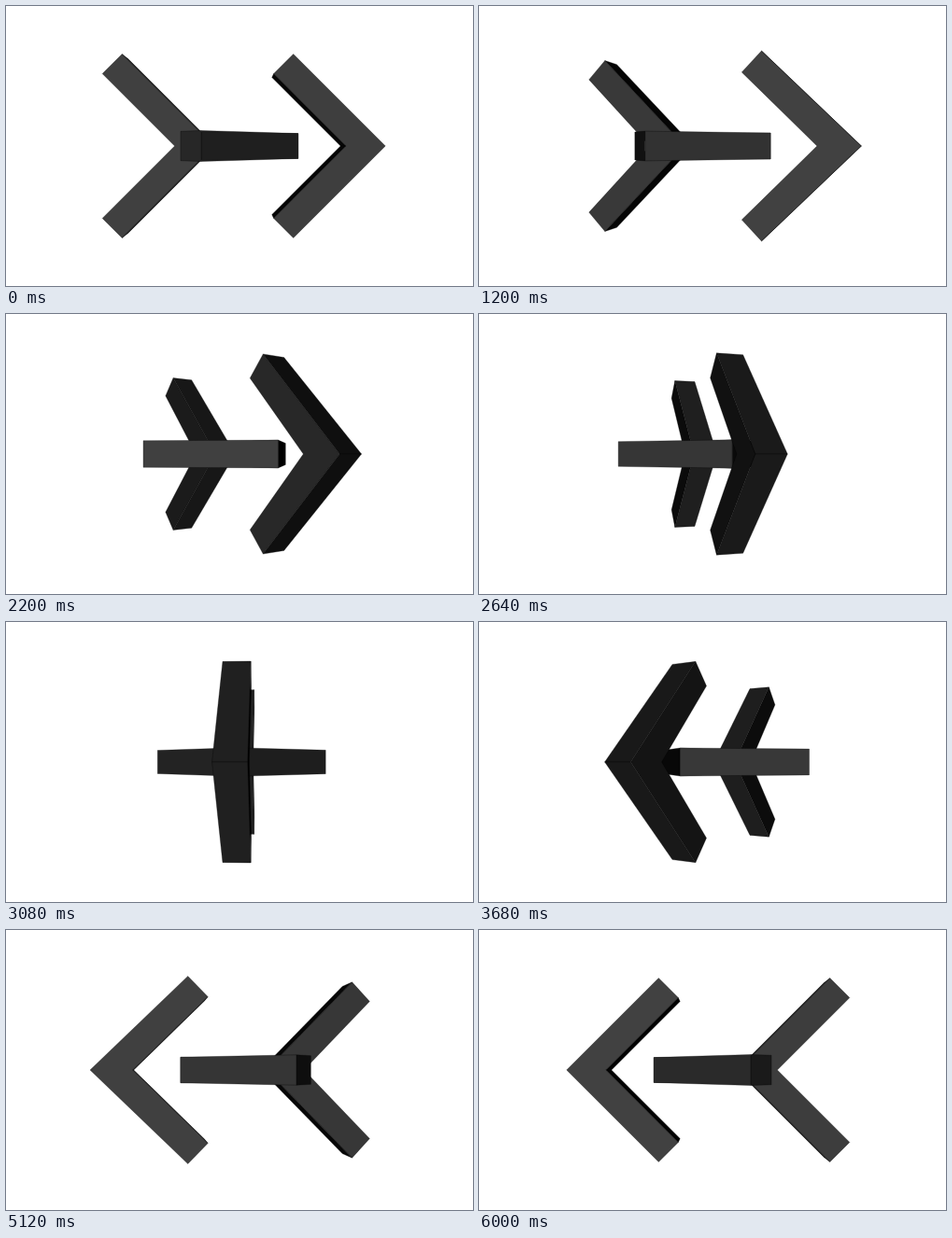
An HTML page with a canvas for the animation above (6040 ms loop, 500 px wide and 300 px high).

```html
<!DOCTYPE html>
<html lang="en">
<head>
<meta charset="utf-8">
<title>Turning arrow</title>
<style>
html, body { margin: 0; width: 500px; height: 300px; overflow: hidden; background: #fff; }
canvas { display: block; }
</style>
</head>
<body>
<canvas width="500" height="300"></canvas>
<script>
const ctx = document.querySelector('canvas').getContext('2d');
const LOOP = 6040, STEP = 40;
const EYE = [0, 0, 508], LAMP = [-45, 0, 508];
const H = 95.9, Q = 20.5;      // chevron half height, end cut offset
const HALF = 13.4;             // half thickness
const MID = 62.75, GAP = 89.3; // middle tip, distance between tips

// Chevron outline, tip at the origin, counter-clockwise
const ring = [[0, 0], [-H, H], [-H - Q, H - Q], [-2 * Q, 0], [-H - Q, Q - H], [-H, -H]];

// Extrude an outline into a list of faces
function prism(outline, place) {
  const front = outline.map(([u, v]) => place(u, v, HALF));
  const back = outline.map(([u, v]) => place(u, v, -HALF));
  const sides = outline.map((_, i) => {
    const j = (i + 1) % outline.length;
    return [back[i], back[j], front[j], front[i]];
  });
  return [front, back.slice().reverse(), ...sides];
}

const upright = tip => (u, v, w) => [u + tip, v, w];
const flat = tip => (u, v, w) => [u + tip, -w, v];

const head = prism(ring, upright(MID + GAP));
const tail = prism(ring, upright(MID - GAP));
const nearArm = prism(ring.slice(0, 4), flat(MID));
const farArm = prism([ring[0], ...ring.slice(3)], flat(MID));

const sub = (a, b) => a.map((n, i) => n - b[i]);
const dot = (a, b) => a.reduce((sum, n, i) => sum + n * b[i], 0);
const cross = (a, b) => [
  a[1] * b[2] - a[2] * b[1],
  a[2] * b[0] - a[0] * b[2],
  a[0] * b[1] - a[1] * b[0]
];
const centre = pts => [0, 1, 2].map(i => pts.reduce((sum, p) => sum + p[i], 0) / pts.length);

function drawFace(face, sin, cos) {
  const pts = face.map(([x, y, z]) => [x * cos - z * sin, y, x * sin + z * cos]);
  const normal = cross(sub(pts[1], pts[0]), sub(pts[2], pts[1]));
  if (dot(normal, sub(EYE, pts[0])) <= 0) return;

  const ray = sub(LAMP, centre(pts));
  const light = Math.max(0, dot(normal, ray) / Math.hypot(...normal) / Math.hypot(...ray));
  const grey = Math.round(65 * light ** 1.5);
  ctx.beginPath();
  for (const [x, y, z] of pts) {
    const s = EYE[2] / (EYE[2] - z);
    ctx.lineTo(250 + x * s, 150 - y * s);
  }
  ctx.closePath();
  ctx.fillStyle = `rgb(${grey},${grey},${grey})`;
  ctx.fill();
  ctx.stroke();
}

// Midway between a cubic and a sine ease
const ease = t => (t * t * (3 - 2 * t) + (1 - Math.cos(Math.PI * t)) / 2) / 2;

function draw(now) {
  const angle = Math.PI * ease(Math.floor(now % LOOP / STEP) * STEP / LOOP);
  const sin = Math.sin(angle), cos = Math.cos(angle);

  ctx.fillStyle = '#fff';
  ctx.fillRect(0, 0, 500, 300);
  ctx.strokeStyle = 'rgba(0,0,0,.4)';
  ctx.lineWidth = 0.8;
  ctx.lineJoin = 'round';

  // Farthest part first
  [[tail, -sin], [nearArm, cos], [farArm, -cos], [head, 2]]
    .sort((a, b) => a[1] - b[1])
    .forEach(([faces]) => faces.forEach(face => drawFace(face, sin, cos)));
}

const start = performance.now();
function tick() {
  draw(performance.now() - start);
  requestAnimationFrame(tick);
}
tick();
</script>
</body>
</html>
```
